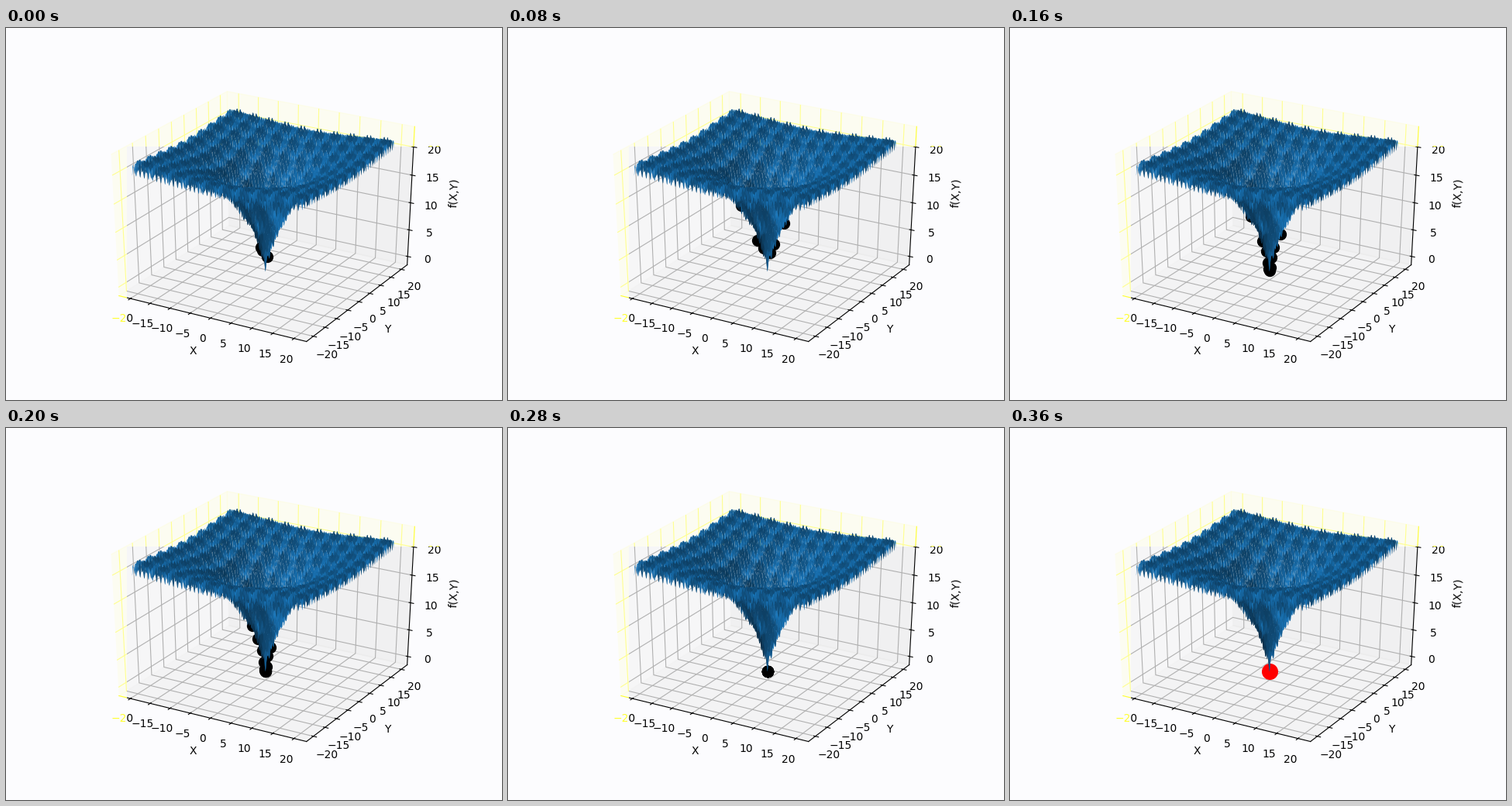
A matplotlib script for the animation above (0.4 s loop, 640 px wide and 480 px high).

```python
import math

import numpy as np
import matplotlib.pyplot as plt
from matplotlib.animation import ArtistAnimation
from matplotlib.transforms import Bbox

W, H = 640, 480
STEPS = 10
PAPER = "#fcfcfe"
YELLOW = "#ffff30"
PALE_YELLOW = "#ffff90"
ZONE_X, ZONE_Y = 156, 153      # left of / above these the axes are yellow
PAD = 25 / 24                  # box edge beyond the data limits


def ackley(x, y):
    bowl = -20 * np.exp(-0.2 * np.sqrt((x**2 + y**2) / 2))
    ripple = -np.exp((np.cos(2 * np.pi * x) + np.cos(2 * np.pi * y)) / 2)
    return bowl + ripple + 20 + math.e


def swarm(step):
    """Particles on the outline of the funnel, ever closer to its tip."""
    reach = np.interp(step, [0, 1, 3, 5, 7], [1, 8, 10, 2.7, 0])
    k = np.arange(3 + 2 * step)
    side = np.where((k > 0) & (k % 2 == 0), 1, -1)
    t = side * reach * 0.62**k
    x, y = t * math.cos(math.pi / 6), t * math.sin(math.pi / 6)
    return x, y, ackley(x, y)


def make_axes(zorder):
    ax = fig.add_axes([0.125, 0.11, 0.775, 0.77], projection="3d",
                      computed_zorder=False, zorder=zorder)
    # A unit cube stretched over the whole axes rectangle
    ax.apply_aspect = lambda position=None: None
    ax.set_box_aspect((1, 1, 1), zoom=math.sqrt(3) / 1.8294640721620434)
    ax.view_init(30, -60)
    ax.patch.set_visible(False)
    ax.set(xlabel="X", ylabel="Y", zlabel="f(X,Y)")
    return ax


def padded(low, high):
    """Data range with a 5 % margin and the box padding on both sides."""
    mid, half = (low + high) / 2, (high - low) / 2 * 1.1 * PAD
    return mid - half, mid + half


def set_scales(ax):
    ticks = range(-20, 21, 5)
    ax.set_xticks(ticks)
    ax.set_yticks(ticks)
    ax.set_zticks(range(0, 21, 5))
    ax.set_xlim(*padded(-20, 20))
    ax.set_ylim(*padded(-20, 20))
    ax.set_zlim(*padded(Z.min(), Z.max()))


def axes_of(ax):
    return ax.xaxis, ax.yaxis, ax.zaxis


def clip_axes(ax, box):
    for axis in axes_of(ax):
        parts = [axis.line, axis.pane, axis.gridlines, axis.label]
        for tick in axis.get_major_ticks():
            parts += tick.get_children()
        for part in parts:
            part.set_clip_on(True)
            part.set_clip_box(box)


grid = np.arange(-20, 20, 0.1)
X, Y = np.meshgrid(grid, grid)
Z = ackley(X, Y)

fig = plt.figure(figsize=(W / 100, H / 100), dpi=100, facecolor=PAPER)

# Yellow axes underneath, visible only left of and above the zone limits
with plt.rc_context({"grid.color": PALE_YELLOW}):
    back = make_axes(0)
set_scales(back)
back.tick_params(colors=YELLOW)
for axis in axes_of(back):
    axis.line.set_color(YELLOW)
    axis.set_pane_color((1, 1, 0.5, 0.1))

fig.add_artist(plt.Rectangle((ZONE_X / W, 0), 1 - ZONE_X / W, 1 - ZONE_Y / H,
                             facecolor=PAPER, edgecolor="none", zorder=1))

ax = make_axes(2)
ax.plot_surface(X, Y, Z, color="#1a78bd", zorder=3)


def dots(points, color, size):
    return ax.scatter(*points, s=size, c=color, depthshade=False, zorder=2)


steps = [[dots(swarm(step), "black", 100)] for step in range(STEPS - 1)]
steps.append([dots(([0], [0], [0]), "red", 200)])

set_scales(ax)
clip_axes(ax, Bbox.from_extents(ZONE_X, 0, W, H - ZONE_Y))

anim = ArtistAnimation(fig, steps, interval=40, repeat=True, repeat_delay=0)
plt.show()
```
